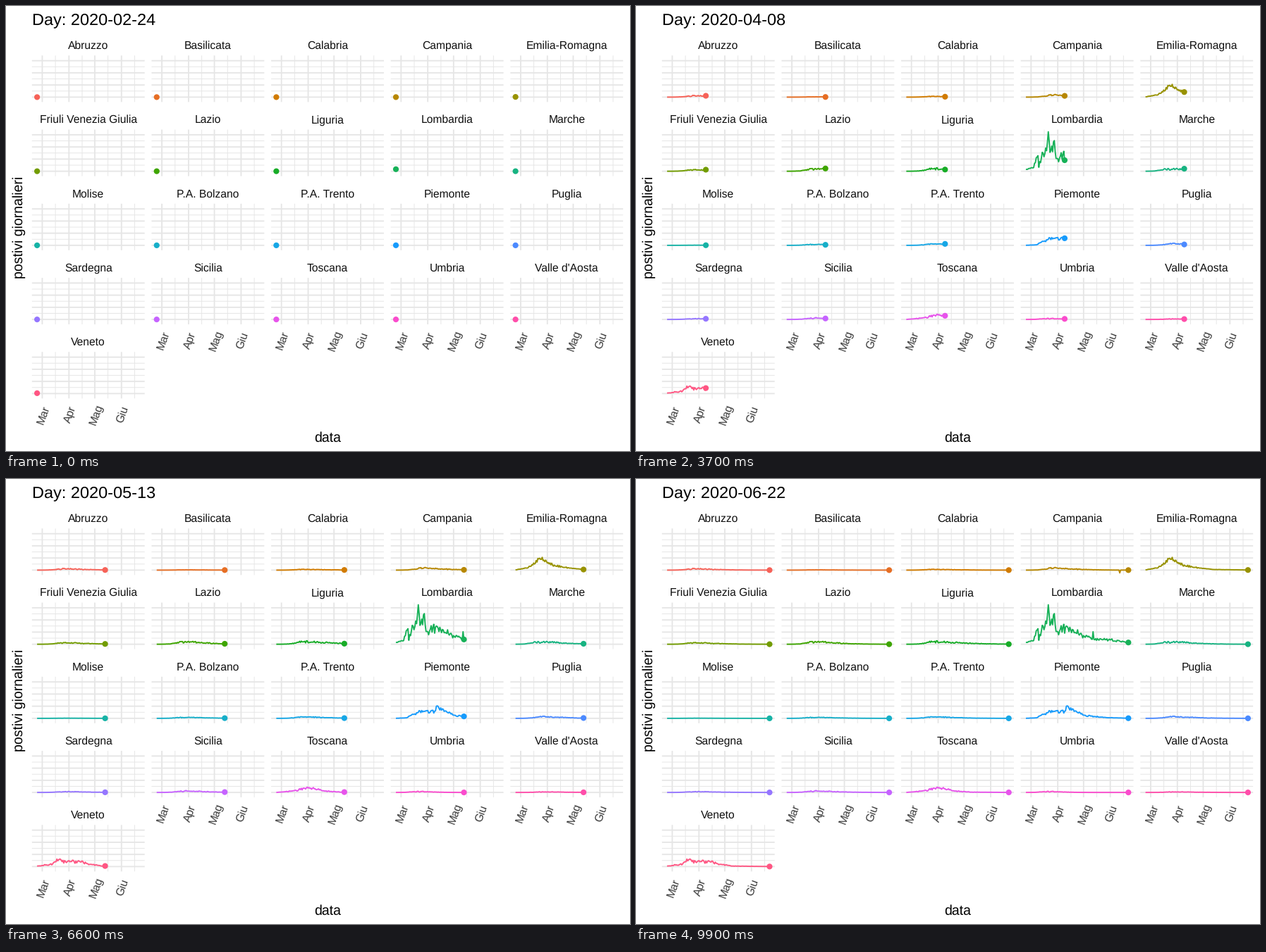
A matplotlib script that plays this animation: 885x632 px, repeating every 10000 ms.

```python
import numpy as np
import matplotlib.pyplot as plt
from matplotlib.animation import FuncAnimation
from matplotlib.collections import LineCollection

W, H, DPI = 885, 632, 100
FRAMES, LAST = 100, 119
UNIT = 19.56                                  # base text size in pixels
LEFT, TOP, ZERO, BOTTOM = 36.83, 70.3, 129.4, 136.35
COL, ROW, WIDTH = 169.63, 105.25, 159.85
X0, DX, DY = 44.1, 1.2212, 0.01724            # first day, px per day, px per case

plt.rcParams.update({
    "font.family": "Liberation Sans",
    "path.snap": False,
    "text.hinting": "none",
})

days = np.arange(LAST + 1)
rng = np.random.default_rng(24)


def tone(rgb):
    """Slightly deeper rendering of a colour."""
    return np.asarray(rgb) ** 1.25


def hue_color(hue, c=100, l=65):
    """Polar CIE-LUV to sRGB at fixed chroma and lightness."""
    a = np.radians(hue)
    u = c * np.cos(a) / (13 * l) + 0.19784
    v = c * np.sin(a) / (13 * l) + 0.46834
    y = ((l + 16) / 116) ** 3
    xyz = np.array([9 * y * u / (4 * v), y, y * (12 - 3 * u - 20 * v) / (4 * v)])
    lin = np.array([[3.2405, -1.5371, -0.4985],
                    [-0.9693, 1.8760, 0.0416],
                    [0.0556, -0.2040, 1.0572]]) @ xyz
    lin = np.clip(lin, 0, 1)
    rgb = tone(np.where(lin > 0.0031308,
                        1.055 * lin ** (1 / 2.4) - 0.055, 12.92 * lin))
    rgb[0] = max(rgb[0], 0.09)
    return rgb


def jitter(amount):
    return 1 + amount * rng.standard_normal(days.size).clip(-2, 2)


def wave(peak, mid=32, rise=9, fall=25):
    """Cases climb to one peak, then fade more slowly."""
    t = days - mid
    shape = np.where(t < 0, np.exp(-0.5 * (t / rise) ** 2),
                     np.exp(-0.6 * (np.abs(t) / fall) ** 1.6))
    return peak * shape * jitter(0.25)


def trend(noise, *points):
    """Cases through a few (day, count) points, noisy on the days between."""
    at, count = np.array(points).T
    scale = jitter(noise)
    scale[at] = 1
    return np.interp(days, at, count) * scale


regions = {
    "Abruzzo": wave(105),
    "Basilicata": wave(22),
    "Calabria": wave(60),
    "Campania": wave(150),
    "Emilia-Romagna": trend(0.12, (0, 18), (12, 170), (18, 316), (28, 980),
                            (33, 814), (43, 420), (57, 225), (79, 50), (119, 10)),
    "Friuli Venezia Giulia": wave(110),
    "Lazio": wave(190),
    "Liguria": wave(190, fall=32),
    "Lombardia": trend(0.18, (0, 166), (9, 300), (14, 1280), (15, 322),
                       (18, 1095), (25, 2380), (26, 3251), (28, 1555),
                       (32, 2409), (36, 1047), (47, 1500), (57, 960), (77, 400),
                       (78, 1033), (79, 394), (93, 384), (119, 143)),
    "Marche": wave(190, mid=29),
    "Molise": wave(12),
    "P.A. Bolzano": wave(75),
    "P.A. Trento": wave(115),
    "Piemonte": trend(0.15, (0, 3), (12, 40), (18, 260), (28, 600), (46, 620),
                      (47, 996), (57, 606), (69, 250), (79, 160), (93, 60),
                      (119, 10)),
    "Puglia": wave(120),
    "Sardegna": wave(60),
    "Sicilia": wave(110),
    "Toscana": trend(0.2, (0, 0), (18, 106), (33, 345), (38, 406), (57, 110),
                     (75, 25), (119, 3)),
    "Umbria": wave(70, mid=27, fall=15),
    "Valle d'Aosta": wave(45),
    "Veneto": trend(0.18, (0, 30), (18, 211), (25, 560), (33, 415), (47, 420),
                    (57, 270), (75, 40), (119, 2)),
}
regions["Campania"][109] = -229               # downward correction of the count


fig = plt.figure(figsize=(W / DPI, H / DPI), dpi=DPI, facecolor="white")
ax = fig.add_axes([0, 0, 1, 1])
ax.set(xlim=(0, W), ylim=(H, 0))
ax.axis("off")


def pt(px):
    return px * 72 / DPI


def grey(level):
    return tone([level] * 3)


def label(x, y, text, scale=1.0, level=0, **kw):
    return ax.text(x, y, text, size=pt(UNIT * scale), color=grey(level),
                   va="baseline", rotation_mode="anchor", **kw)


def grid(xs, ys, dx, dy, px, z):
    segs = [[(x + dx, TOP + dy), (x + dx, BOTTOM + dy)] for x in xs]
    segs += [[(LEFT + dx, y + dy), (LEFT + WIDTH + dx, y + dy)] for y in ys]
    ax.add_collection(LineCollection(segs, colors=[grey(0.92)], linewidths=pt(px),
                                     capstyle="butt", zorder=z))


months = {"Mar": 6, "Apr": 37, "Mag": 67, "Giu": 98}
starts = np.array(list(months.values()))
major_x = X0 + DX * starts
minor_x = X0 + DX * (starts + 15.3)
major_y = ZERO - DY * np.arange(0, 3001, 1000)
minor_y = ZERO - DY * np.arange(500, 2501, 1000)

curves, paths = [], []
colors = [hue_color(15 + 360 * i / len(regions)) for i in range(len(regions))]
for i, (name, cases) in enumerate(regions.items()):
    dx, dy = i % 5 * COL, i // 5 * ROW
    grid(minor_x, minor_y, dx, dy, 0.95, 1)
    grid(major_x, major_y, dx, dy, 1.9, 2)
    label(LEFT + WIDTH / 2 + dx, 61 + dy, name, 0.8, 0.1, ha="center")
    if i > 15:
        for text, x in zip(months, major_x):
            label(x + dx + 5.8, BOTTOM + dy + 24.5, text, 0.8, 0.3,
                  ha="center", rotation=70)
    paths.append(np.column_stack([X0 + dx + DX * days, ZERO + dy - DY * cases]))
    curves += ax.plot([], [], color=colors[i], lw=pt(1.9), zorder=3,
                      solid_capstyle="butt", solid_joinstyle="round")

paths = np.array(paths)
dots = ax.scatter(paths[:, 0, 0], paths[:, 0, 1], s=pt(8.2) ** 2, c=colors,
                  linewidths=0, zorder=4)
title = label(LEFT, 25.9, "", 1.2, ha="left")
label(LEFT + 2 * COL + WIDTH / 2, 619, "data", ha="center")
label(23.8, 313.9, "postivi giornalieri", ha="center", rotation=90)


def update(k):
    day = (2 * k + 1) * LAST // (2 * (FRAMES - 1))   # newest day on show
    for curve, path in zip(curves, paths):
        curve.set_data(path[:day + 1].T)
    dots.set_offsets(paths[:, day])
    date = np.datetime64("2020-02-24") + k * LAST // (FRAMES - 1)
    title.set_text(f"Day: {date}")
    return [*curves, dots, title]


anim = FuncAnimation(fig, update, frames=FRAMES, interval=100,
                     init_func=lambda: update(0), repeat=True, repeat_delay=0)
plt.show()
```
